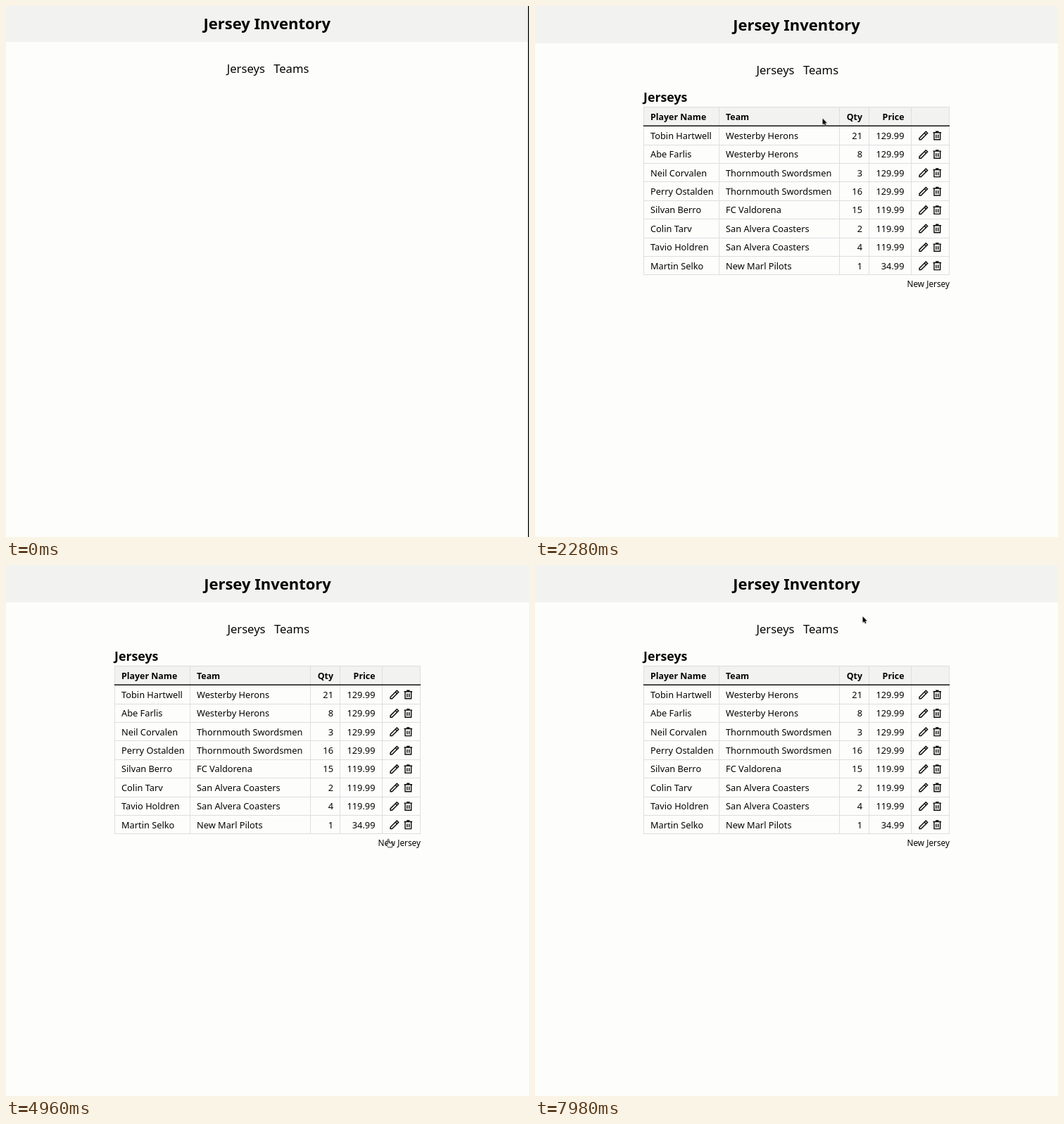
These frames come from a looping animation (743x754 px, 8000 ms). An HTML page:

```html
<!DOCTYPE html>
<html lang="en">
<head>
<meta charset="utf-8">
<title>Jersey Inventory</title>
<style>
html, body { margin: 0; width: 100%; height: 100%; overflow: hidden; background: #fdfdfc; }
svg { display: block; width: 743px; height: 754px; font-family: "Noto Sans", "Open Sans", sans-serif; }
text { fill: #050505; }
.title { font-size: 22px; font-weight: 700; text-anchor: middle; }
.nav { font-size: 16.6px; text-anchor: middle; }
.heading { font-size: 17.8px; font-weight: 700; }
.head { font-size: 12.4px; font-weight: 700; }
.cell { font-size: 12.8px; }
.new { font-size: 11.8px; }
.num { text-anchor: end; }
.bar { fill: #f2f2f1; }
.grid { fill: none; stroke: #dededf; }
.icon { fill: none; stroke: #0a0a0a; stroke-width: 2; }

#page, #cursor, #edge, #underline, #table, #arrow, #hand { animation: 8s infinite; }
#page { animation-name: settle; animation-timing-function: step-end; }
#cursor { animation-name: path, enter; animation-duration: 8s; animation-timing-function: linear, step-end; }
#edge { animation-name: edge; animation-timing-function: step-end; }
#underline { animation-name: press; animation-timing-function: step-end; }
#table { animation-name: load; animation-timing-function: step-end; }
#arrow { animation-name: arrow; animation-timing-function: step-end; }
#hand { animation-name: hand; animation-timing-function: step-end; }

@keyframes settle {
  0% { transform: translate(-.7px, -2px); }
  .375% { transform: translate(-.5px, -1.3px); }
  1.125% { transform: translate(-.2px, -.6px); }
  1.875%, 100% { transform: none; }
}
@keyframes edge { 0% { visibility: visible; } 1.125%, 100% { visibility: hidden; } }
@keyframes press {
  0%, 26.375%, 100% { visibility: hidden; }
  18.625% { visibility: visible; }
}
@keyframes load { 0% { visibility: hidden; } 22.75%, 100% { visibility: visible; } }
@keyframes enter { 0% { visibility: hidden; opacity: 0; } 7.125%, 100% { visibility: visible; opacity: 1; } }
@keyframes arrow {
  0%, 26.5%, 62.5%, 69.75%, 80%, 94.625%, 100% { opacity: 1; }
  13.25%, 48.75%, 67.125%, 72%, 81.75% { opacity: 0; }
}
@keyframes hand {
  0%, 26.5%, 62.5%, 69.75%, 80%, 94.625%, 100% { opacity: 0; }
  13.25%, 48.75%, 67.125%, 72%, 81.75% { opacity: 1; }
}
@keyframes path {
  0%, 7.125% { transform: translate(437px, 19px); }
  9.5% { transform: translate(379.5px, 69.5px); animation-timing-function: ease-out; }
  13.75%, 26.375% { transform: translate(343px, 100px); }
  28.5% { transform: translate(407.5px, 159.5px); animation-timing-function: ease-out; }
  31.75%, 37.125% { transform: translate(563px, 181px); }
  39.375% { transform: translate(420px, 173px); }
  41.625% { transform: translate(280px, 235px); }
  43.75% { transform: translate(325px, 350px); }
  45.625% { transform: translate(445.5px, 360px); }
  47.375% { transform: translate(503px, 367px); animation-timing-function: ease-out; }
  49.375%, 62% { transform: translate(543px, 389.5px); }
  65% { transform: translate(562px, 340px); animation-timing-function: ease-out; }
  67.625% { transform: translate(550px, 287px); }
  69.5% { transform: translate(550px, 287px); animation-timing-function: ease-in-out; }
  73% { transform: translate(570px, 285px); }
  79.75% { transform: translate(570px, 285px); animation-timing-function: ease-in-out; }
  82.125%, 94.5% { transform: translate(396px, 95px); }
  94.625% { transform: translate(430px, 65px); }
  94.875% { transform: translate(468px, 31px); }
  97.5% { transform: translate(468px, 31px); animation-timing-function: ease-out; }
  99.75%, 100% { transform: translate(465.5px, 73px); }
}
</style>
</head>
<body>
<svg viewBox="0 0 743 754">
  <defs>
    <g id="icons" class="icon">
      <g transform="translate(543.2 175.2) scale(.73)">
        <path d="M4 20v-3.2L16.6 4.2l3.2 3.2L7.2 20zM13.8 7l3.2 3.2"/>
      </g>
      <g transform="translate(562.7 175.4) scale(.72)">
        <path d="M6 7v13h12V7M4 6h16M9 4h6M10 10v7M14 10v7"/>
      </g>
    </g>
  </defs>
  <g id="page">
    <rect class="bar" y="-4" x="-4" width="751" height="57"/>
    <text class="title" x="371.5" y="35">Jersey Inventory</text>
    <text class="nav" x="341.5" y="97">Jerseys</text>
    <text class="nav" x="406" y="97">Teams</text>
    <rect id="underline" x="313" y="100" width="57" height="1"/>
    <g id="table">
      <text class="heading" x="154" y="136">Jerseys</text>
      <rect class="bar" x="154" y="143.5" width="435" height="26.5"/>
      <path id="lines" class="grid"/>
      <path d="M154 170.2H589" stroke="#111" stroke-width="1.4"/>
      <text class="head" x="164" y="161.7">Player Name</text>
      <text class="head" x="271" y="161.7">Team</text>
      <text class="head num" x="465" y="161.7">Qty</text>
      <text class="head num" x="524.5" y="161.7">Price</text>
      <g id="rows"></g>
      <text class="new num" x="589" y="398.7">New Jersey</text>
    </g>
  </g>
  <rect id="edge" x="741.7" width="1.3" height="754"/>
  <g id="cursor">
    <path id="arrow" d="M0 0v9l2.1-1.9 1.4 3.1 1.5-.7-1.4-3h2.8z" fill="#000" stroke="#fff" stroke-width=".8" paint-order="stroke"/>
    <path id="hand" d="M-1 1c0-1.3 2-1.3 2 0v4l4 .8c1 .2 1.2.8 1 1.8l-.7 4h-5.5l-3-4c-.6-1 .6-1.7 1.3-1l.9.9z" fill="#fff" stroke="#111" stroke-width=".9"/>
  </g>
</svg>
<script>
const ROW = 26.4;
const stock = [
  ["Tobin Hartwell", "Westerby Herons", 21, "129.99"],
  ["Abe Farlis", "Westerby Herons", 8, "129.99"],
  ["Neil Corvalen", "Thornmouth Swordsmen", 3, "129.99"],
  ["Perry Ostalden", "Thornmouth Swordsmen", 16, "129.99"],
  ["Silvan Berro", "FC Valdorena", 15, "119.99"],
  ["Colin Tarv", "San Alvera Coasters", 2, "119.99"],
  ["Tavio Holdren", "San Alvera Coasters", 4, "119.99"],
  ["Martin Selko", "New Marl Pilots", 1, "34.99"]
];
const cell = (x, y, value, extra = "") =>
  `<text class="cell ${extra}" x="${x}" y="${y}">${value}</text>`;

document.getElementById("rows").innerHTML = stock.map(([player, team, qty, price], i) => {
  const y = 188.7 + ROW * i;
  return cell(164, y, player) + cell(271, y, team) +
    cell(465, y, qty, "num") + cell(524.5, y, price, "num") +
    `<use href="#icons" y="${ROW * i}"/>`;
}).join("");

const columns = [154.5, 261.5, 432.5, 474.5, 534.5, 588.5].map(x => `M${x} 143.5V382`);
const rules = stock.map((_, i) => `M154 ${Math.floor(197 + ROW * i) + .5}H589`);
document.getElementById("lines").setAttribute("d", columns.join("") + rules.join("") + "M154 143.5H589");
</script>
</body>
</html>
```
